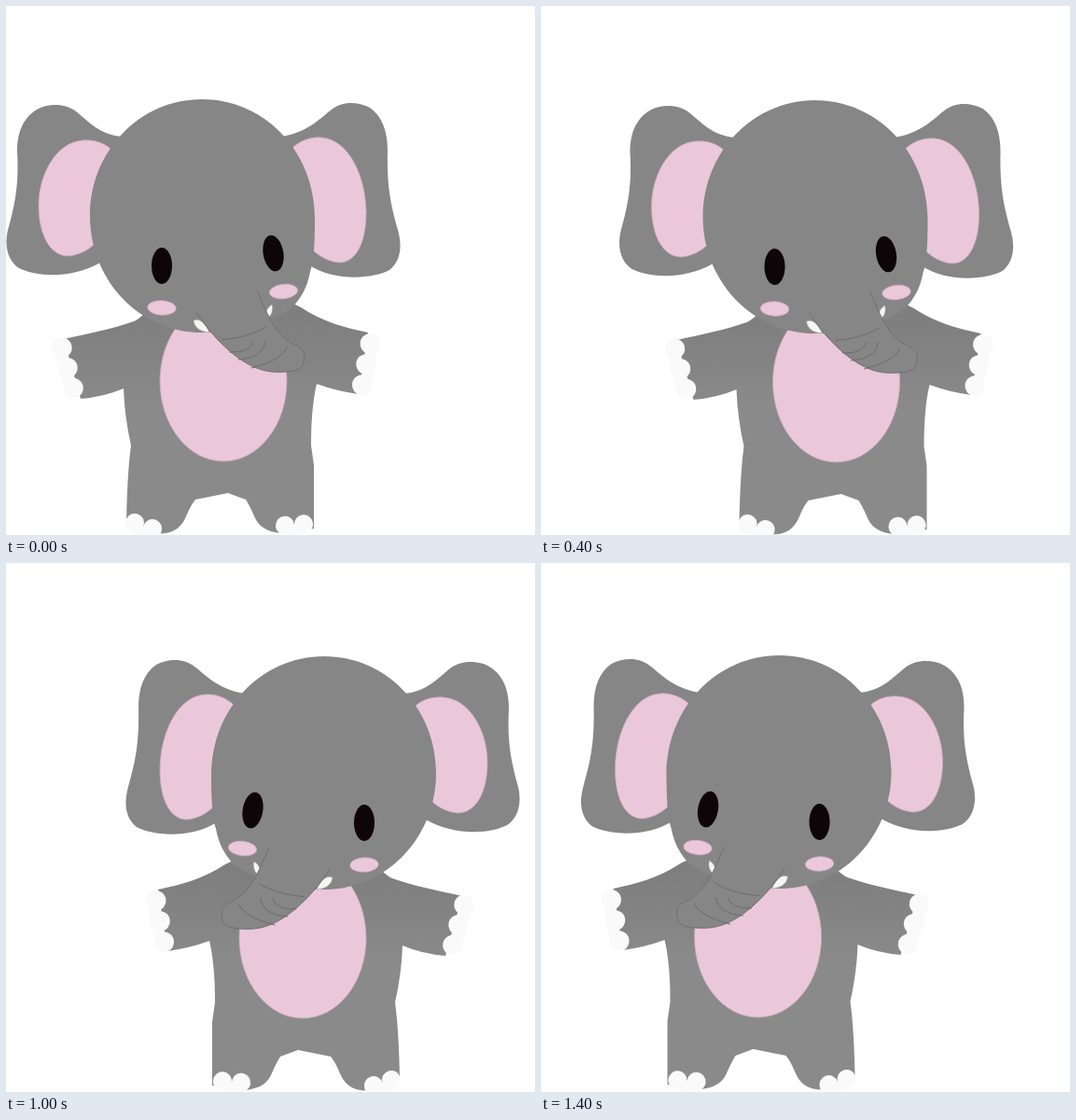
An HTML page for the animation above (1600 ms loop, 567x567 px).

```html
<!DOCTYPE html>
<html lang="en">
<head>
<meta charset="utf-8">
<title>Dancing elephant</title>
<style>
  html, body { margin: 0; width: 100%; height: 100%; overflow: hidden; background: #fff; }
  svg { display: block; width: 100vw; height: 100vh; }
  .pose {
    visibility: hidden;
    animation: show 1.6s step-end infinite;
    animation-delay: calc((var(--i) - 8) * .2s);
  }
  @keyframes show {
    0% { visibility: visible; }
    12.5%, 100% { visibility: hidden; }
  }
  .skin { fill: #868686; }
  .body { fill: url(#shade); }
  .pink { fill: #eac8da; stroke: #c9abb9; stroke-width: .8; }
  .eye { fill: #0d0508; }
  .nail { fill: #fafafa; }
  .tusk { fill: #f5f5f1; stroke: #a5a5a5; stroke-width: .6; }
  .line { fill: none; stroke: #6c6c6c; stroke-width: 1; stroke-linecap: round; }
  .trunk { fill: #868686; stroke: #707070; stroke-width: 1; }
</style>
</head>
<body>
<svg viewBox="0 0 567 567" xmlns="http://www.w3.org/2000/svg">
  <defs>
    <linearGradient id="shade" gradientUnits="userSpaceOnUse" x1="0" y1="325" x2="0" y2="425">
      <stop offset="0" stop-color="#7e7e7e"/>
      <stop offset=".5" stop-color="#838383"/>
      <stop offset="1" stop-color="#8a8a8a"/>
    </linearGradient>

    <g id="earL">
      <path class="skin" d="M145 150L125 140C99 138 87 122 75 113C64 104 45 104 33 111C18 120 12 136 12 156C14 190 10 212 2 240C-2 258 2 273 14 281C34 291 72 292 101 275Z"/>
      <path class="pink" d="M112 153C104 146 93 143 82 144C54 146 35 180 35 214C35 245 47 268 67 268C78 267 88 262 96 254Z"/>
    </g>
    <g id="earR">
      <path class="skin" d="M275 150L295 140C325 135 338 119 349 111C360 102 376 102 390 109C403 118 409 134 409 155C408 195 413 215 420 240C425 258 423 273 411 283C392 293 352 295 325 278Z"/>
      <path class="pink" d="M306 153C314 145 326 140 338 141C368 143 386 184 386 222C386 252 376 275 357 275C346 274 337 269 328 261Z"/>
    </g>
    <path id="head" class="skin" d="M210 100C277 100 331 156 331 228C331 262 329 276 326 285C323 301 317 312 307 323C282 340 250 350 210 350C143 350 90 294 90 225C90 156 143 100 210 100Z"/>
    <g id="face">
      <ellipse class="eye" cx="167" cy="278.5" rx="11" ry="19.5"/>
      <ellipse class="eye" cx="286.5" cy="265" rx="10.800" ry="19.5" transform="rotate(-10 286.5 265)"/>
      <ellipse class="pink" cx="167" cy="323.5" rx="15.3" ry="7.8" transform="rotate(3 167 323.5)"/>
      <ellipse class="pink" cx="297.5" cy="306" rx="15.3" ry="7.8" transform="rotate(-6 297.5 306)"/>
    </g>
    <g id="trunk">
      <path class="tusk" d="M201 337C207 334 214 340 218 350C208 349 202 345 201 337Z"/>
      <path class="tusk" d="M285 320C287 326 284 333 280 334C277 330 279 324 285 320Z"/>
      <path class="trunk" d="M204 328C215 345 226 358 241 371C262 388 278 394 300 392C312 391 318 389 319 382C321 374 319 368 313 365C300 359 293 352 286 341C279 329 275 318 269 305"/>
      <path class="line" d="M232 357.5C250 356 266 352 279 344M240 371Q262 372 265 360M249 379Q276 377 278 360M263 388Q297 379 301 366"/>
    </g>
    <g id="top">
      <use href="#head"/>
      <use href="#face"/>
      <use href="#trunk"/>
    </g>
    <g id="ears">
      <use href="#earL"/>
      <use href="#earR"/>
    </g>

    <g id="hand" class="nail">
      <path d="M2 -33.5C-14 -28 -14 28 2 33.5Z"/>
      <circle cy="-22.5" r="10.8"/>
      <circle r="10.8"/>
      <circle cy="22.5" r="10.8"/>
    </g>
    <g id="foot" class="nail">
      <path d="M-20 0Q-20 11 0 12Q20 11 20 0Z"/>
      <circle cx="-10" r="10"/>
      <circle cx="10" r="10"/>
    </g>

    <!-- standing pose, facing right -->
    <g id="stand">
      <use href="#ears"/>
      <path class="body" d="M150 328Q142 336 137 338C115 346 88 351 62 357L80 421Q105 419 126 410Q127 440 134 471Q130 500 129 552Q131 562 155 565C178 568 188 560 194 545Q198 535 203 529L238 522L257 529Q262 537 267 549C273 562 288 566 305 565L330 560L330 492L327 471Q327 430 333 405Q355 413 378 416L388 350C365 345 340 339 316 323L290 310Z"/>
      <ellipse class="pink" cx="233" cy="402" rx="68" ry="86"/>
      <use href="#hand" transform="translate(66 388) rotate(-15.6)"/>
      <use href="#hand" transform="translate(386 384) rotate(11) scale(-1 1)"/>
      <use href="#foot" transform="translate(147.5 557) rotate(18)"/>
      <use href="#foot" transform="translate(309 556) rotate(-4)"/>
      <use href="#top"/>
    </g>
  </defs>

  <g class="pose" style="--i:0"><use href="#stand"/></g>

  <!-- right leg kicks out -->
  <g class="pose" style="--i:1">
    <use href="#ears" x="43" y="1"/>
    <path class="body" d="M194 326Q184 337 178 340C155 349 130 355 105 362L125 425Q150 422 170 412Q172 440 179 472Q175 500 172 553Q178 564 205 567C226 568 235 560 241 548Q246 536 251 530Q275 524 296 517L319 518C329 530 338 542 357 542L394 522Q387 490 376 455C369 436 372 405 378 394Q398 401 420 402L428 335C400 334 374 328 352 318L330 306Z"/>
    <ellipse class="pink" cx="275.5" cy="400" rx="67.5" ry="85"/>
    <use href="#hand" transform="translate(110 393) rotate(-17)"/>
    <use href="#hand" transform="translate(427 370) rotate(7) scale(-1 1)"/>
    <use href="#foot" transform="translate(191 556) rotate(20)"/>
    <use href="#foot" transform="translate(374 529) rotate(-23)"/>
    <use href="#head" x="42.5" y="1"/>
    <use href="#face" transform="matrix(.99 -.025 0 1 43.5 5)"/>
    <use href="#trunk" transform="matrix(.98 0 0 .92 46 26)"/>
  </g>

  <g class="pose" style="--i:2"><use href="#stand" x="83.5" y="1"/></g>

  <!-- left knee bends -->
  <g class="pose" style="--i:3">
    <use href="#earL" transform="rotate(-2 93 260) matrix(.98 0 0 1 93 5.5)"/>
    <use href="#earR" transform="rotate(2 507 260) matrix(.98 0 0 1 93 6)"/>
    <path class="body" d="M244 329Q233 341 225 345C203 355 178 367 155 388L190 442Q212 437 228 417Q228 448 222 468L209 492Q207 500 211 508Q221 528 230 552Q232 563 250 565C276 568 287 563 294 548Q298 536 302 526Q330 521 343 524L360 530Q366 538 371 549C377 563 390 566 408 566L435 560L435 500L431 470Q430 430 431 408Q432 404 438 405Q455 412 475 413L484 348C460 344 434 337 411 322L385 310Z"/>
    <ellipse class="pink" cx="332.5" cy="402" rx="68.5" ry="86.5" transform="translate(-28 0) skewX(4)"/>
    <use href="#hand" transform="translate(171 415) rotate(-34)"/>
    <use href="#hand" transform="translate(484 383) rotate(8) scale(-1 1)"/>
    <use href="#foot" transform="translate(251 558) rotate(12)"/>
    <use href="#foot" transform="translate(413 559) rotate(-5)"/>
    <use href="#head" transform="matrix(.98 0 0 1 93 1)"/>
    <use href="#face" transform="matrix(.99 -.02 0 1 94.5 5.8)"/>
    <use href="#trunk" transform="matrix(1 -.02 0 1 95 6)"/>
  </g>

  <!-- right arm raised -->
  <g class="pose" style="--i:4">
    <use href="#ears" x="155"/>
    <path class="body" d="M305 328Q297 337 290 340C266 348 243 351 217 357L235 421Q260 420 282 410Q283 440 289 471Q285 500 284 552Q286 562 310 565C333 568 343 560 349 545Q353 535 358 529L394 522L413 529Q418 537 423 549C429 562 443 566 460 565L485 560L485 471Q486 420 494 397Q518 394 543 384L526 318C508 324 486 334 465 323L445 310Z"/>
    <ellipse class="pink" cx="389.5" cy="402" rx="69.5" ry="86"/>
    <use href="#hand" transform="translate(221 388) rotate(-15.6)"/>
    <use href="#hand" transform="translate(537 350) rotate(-14) scale(-1 1)"/>
    <use href="#foot" transform="translate(302.5 557) rotate(18)"/>
    <use href="#foot" transform="translate(464 556) rotate(-4)"/>
    <use href="#top" x="155"/>
  </g>

  <g class="pose" style="--i:5"><use href="#stand" transform="matrix(-1 0 0 1 551 0)"/></g>

  <!-- leaning, facing left -->
  <g class="pose" style="--i:6">
    <use href="#earR" transform="rotate(-2 93 275) matrix(-1 0 0 1 515 21)"/>
    <use href="#earL" transform="rotate(-3.5 512 245) matrix(-1 0 0 1 511 -6)"/>
    <path class="body" d="M225 320Q212 328 200 329C175 337 152 340 128 341L131 408Q155 408 175 402Q181 404 183 420Q185 445 183 465Q177 485 173 546Q184 560 213 564C226 562 235 549 240 538Q243 531 246 528L265 522L303 531Q308 537 313 547C320 561 330 568 348 567L378 560Q380 540 375 510L372 478Q376 450 382 417Q405 426 430 428L446 361C425 355 398 350 372 345L358 328Z"/>
    <path class="pink" d="M209 402C209 372 230 352 260 340L318 340C335 356 343 380 343 403C343 452 318 489 280 489C248 489 209 445 209 402Z"/>
    <use href="#hand" transform="translate(126.5 376) rotate(-4)"/>
    <use href="#hand" transform="translate(442 393) rotate(16) scale(-1 1)"/>
    <use href="#foot" transform="translate(192 555) rotate(17)"/>
    <use href="#foot" transform="translate(360 558) rotate(-18)"/>
    <use href="#head" transform="matrix(-.988 0 0 .988 510 10.2)"/>
    <use href="#face" transform="matrix(-.979 .03 0 1 507.5 1.5)"/>
    <use href="#trunk" transform="matrix(-1 0 0 .92 512 35)"/>
  </g>

  <g class="pose" style="--i:7"><use href="#stand" transform="matrix(-1 0 0 1 465.5 -1)"/></g>
</svg>
</body>
</html>
```
